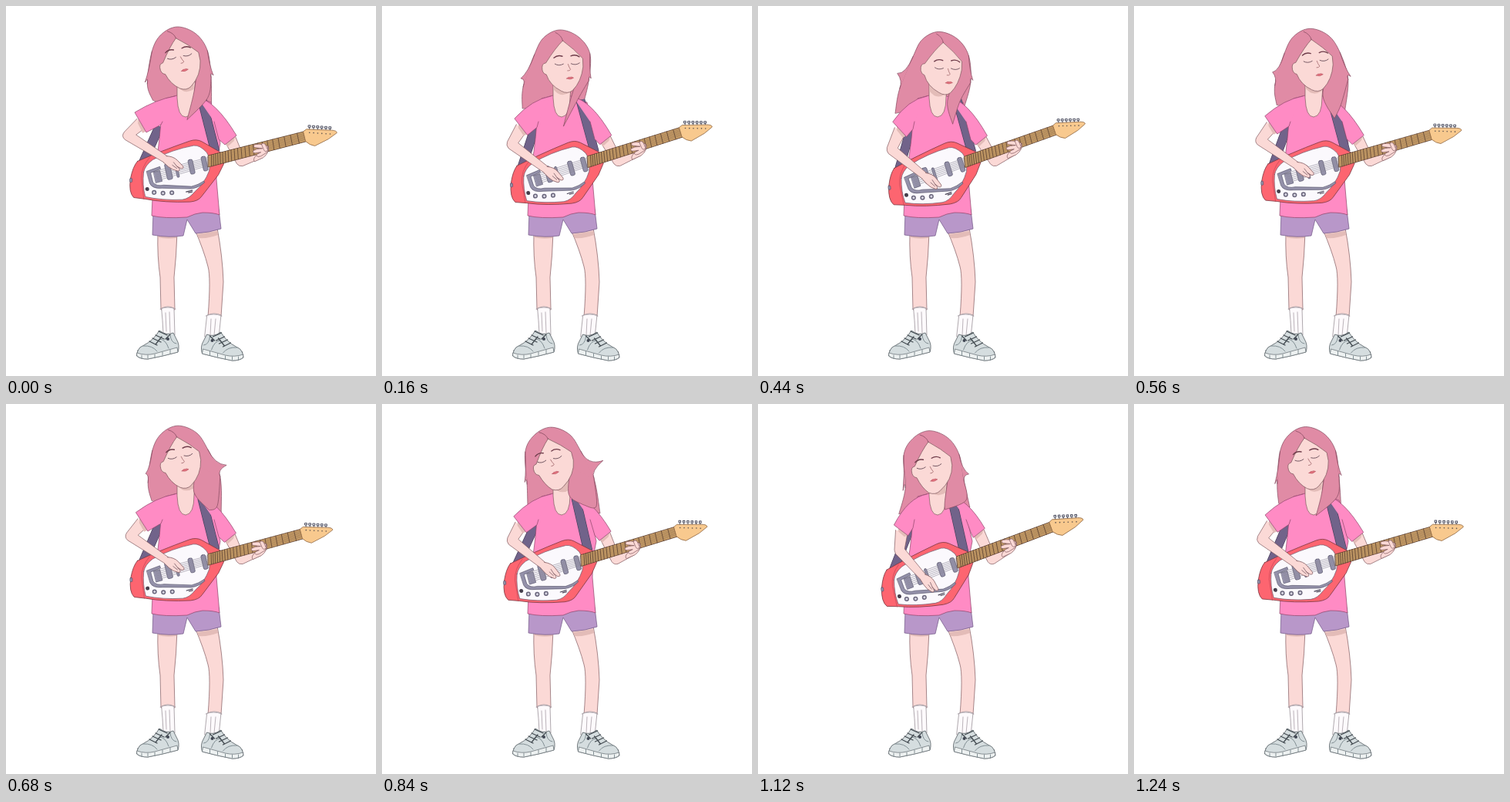
An HTML page for the animation above (1280 ms loop, 480 px wide and 480 px high).

```html
<!DOCTYPE html>
<html lang="en">
<head>
<meta charset="utf-8">
<title>Guitar player</title>
<style>
  html, body { margin: 0; width: 100%; height: 100%; overflow: hidden; background: #fff; }
  svg { display: block; width: 100vw; height: 100vh; }
  path, circle, rect { stroke-linejoin: round; stroke-linecap: round; }
  .ln { fill: none; stroke: #5d4350; stroke-width: .8; }
  .skin { fill: #fbd9d6; stroke: #80595f; stroke-width: .7; }
  .shade { fill: #e3bcb8; }
  .hair { fill: #e08ba5; stroke: #85495f; stroke-width: .7; }
  .shirt { fill: #ff8bc4; stroke: #8d4569; stroke-width: .7; }
  .shorts { fill: #b897c9; stroke: #6f5585; stroke-width: .7; }
  .sock { fill: #fdfafc; stroke: #8d858c; stroke-width: .7; }
  .shoe { fill: #d5dddf; stroke: #535c61; stroke-width: .8; }
  .metal { fill: #9491aa; stroke: #4d4a61; stroke-width: .6; }
  .strapEdge { fill: none; stroke: #443a56; stroke-width: 12; stroke-linecap: butt; }
  .strap { fill: none; stroke: #71638a; stroke-width: 10.8; stroke-linecap: butt; }
</style>
</head>
<body>
<svg viewBox="0 0 480 480">
  <defs>
    <g id="shoe">
      <path class="shoe" d="M171 447L169.500 454Q174 458 184 458L203 454L223 449Q226 440 221 432L217 424Q208 428 199 421Q191 434 179 440Q173 442 171 447Z"/>
      <path d="M170 450Q181 454 193 451L222 443L223 449L203 454L184 458Q174 458 170 454Z" fill="#edf1f1" stroke="#626b70" stroke-width=".7"/>
      <path d="M178 441Q190 440 196 448M199 432Q207 432 211 444M213 427Q214 437 221 438M176 453v4M184 453v4M193 452v4M203 449v4M213 446v5" fill="none" stroke="#79868c" stroke-width=".9"/>
      <path d="M186 435l10 5M190 431l11 5M194 427l11 5M198 422l11 5M202 429l-8 10M213 426l-6 6" fill="none" stroke="#444c52" stroke-width="1.300"/>
      <circle cx="210" cy="432" r="2" fill="#404653"/>
    </g>
  </defs>

  <path id="backHair" class="hair"/>
  <path id="flickL" class="hair"/>
  <path id="flickR" class="hair"/>
  <path id="backStrapEdge" class="strapEdge"/>
  <path id="backStrap" class="strap"/>

  <path class="skin" d="M197 294Q196 325 200 352L201 394H219L218 352Q221 325 222 294Z"/>
  <path class="skin" d="M245 290Q257 318 262 338Q266 352 262 403H279L282 358Q281 325 274 288Z"/>
  <path class="shade" d="M197 297L222 298L221 301Q208 303 197 300ZM248 296L274 292L275 297Q262 302 250 301Z"/>
  <path class="sock" d="M202 392Q210 388 218 392L219 427Q211 432 204 425L203 408Z"/>
  <path class="sock" d="M261 401Q270 397 279 401L276 430Q268 434 258 429Z"/>
  <path d="M200 393q10 -4 20 0M207 398l1 24M212 397l1 27M259 402q10 -4 21 0M266 406l-1 21M272 406l-2 21" fill="none" stroke="#aaa1a9" stroke-width=".8"/>
  <use href="#shoe"/>
  <use href="#shoe" transform="translate(477.500 2) scale(-1 1)"/>
  <path class="shorts" d="M191 267L190 297Q212 301 230 298L235 277L246 295Q264 294 279 289L276 264Z"/>

  <path class="shirt" d="M222 116L207 120L201 150Q198 190 191 225L189 272Q205 276 235 274Q245 269 255 268Q270 268 277 271L273 225Q273 200 278 178L266 125L245 117Z"/>
  <path class="skin" d="M222 92V119Q223 144 233 144Q244 143 244 118L246 92Z"/>
  <path id="neckShade" class="shade"/>
  <path id="frontStrapEdge" class="strapEdge"/>
  <path id="frontStrap" class="strap"/>
  <path id="armR" class="skin"/>
  <path id="cuffShadeR" class="shade"/>
  <path id="sleeveR" class="shirt"/>

  <g id="guitar">
    <path d="M170 200Q200 187 238 174Q247 171 254 175L278 189Q284 196 282 204L275 218L253 246Q249 252 238 253Q205 254 180 249L165 247Q158 240 161 222Q164 207 170 200Z" fill="#fd6570" stroke="#7b3943" stroke-width=".8"/>
    <path d="M186 195Q175 207 175 222L178 249" fill="none" stroke="#c54858" stroke-width=".7"/>
    <rect x="160" y="222" width="3" height="5" rx="1" class="metal"/>
    <path d="M178 214Q180 205 190 198Q215 185 243 180Q251 179 260 189Q266 198 263 213Q257 229 244 240Q237 249 228 250Q202 251 180 246Q176 231 178 214Z" fill="#fbf9fd" stroke="#70566a" stroke-width=".7"/>
    <path class="metal" d="M182 213L199 207L200 210L187 215L190 227Q194 233 204 231L240 233Q249 231 256 226L257 228Q249 235 239 236L202 235Q189 236 186 229Z"/>
    <path class="metal" d="M191 214L199 212L202 226L194 228Z"/>
    <g class="metal">
      <rect x="207" y="203" width="7" height="21" rx="2" transform="rotate(-12 210 214)"/>
      <rect x="220" y="204" width="3" height="17" rx="1" transform="rotate(-12 222 213)"/>
      <rect x="237" y="198" width="6" height="19" rx="2" transform="rotate(-12 240 207)"/>
      <rect x="254" y="194" width="6" height="19" rx="2" transform="rotate(-12 257 203)"/>
    </g>
    <g fill="#d7d5e2" stroke="#6a667c" stroke-width="1.500"><circle cx="191.500" cy="240.500" r="2.300"/><circle cx="203" cy="241.500" r="2.300"/><circle cx="214.500" cy="241" r="2.300"/></g>
    <circle cx="182.500" cy="236" r="2.500" fill="#443e4c"/>
    <path d="M233 240l8 -2M236 241l5 -1" fill="none" stroke="#4c4658" stroke-width="1.200"/>
    <path id="bodyStrings" fill="none" stroke="#8b8796" stroke-width=".6"/>
    <g id="neckPart">
      <path id="pegs" fill="#f4f4f8" stroke="#4d4f60" stroke-width="1"/>
      <path d="M262 193L388 162L391 175L262 208Z" fill="#d2a66c" stroke="#5e4030" stroke-width=".9"/>
      <path id="frets" fill="none" stroke="#614634" stroke-width=".9"/>
      <path id="neckStrings" fill="none" stroke="#745841" stroke-width=".5"/>
      <path d="M387 162L391 159L424 160.500Q431 161 431 164L420 172L402 181Q395 180 390 175Z" fill="#f8c98e" stroke="#8f6744" stroke-width=".8"/>
      <path id="pins" fill="none" stroke="#5f5450" stroke-width="1.600"/>
    </g>
  </g>

  <g id="fretHand">
    <path class="skin" d="M12 -5Q13 3 5 9L-6 14Q-9 11 -4 6L4 0Z"/>
    <path class="skin" d="M11 -6Q3 -10 -6 -8Q-9 -5 -5 -4L4 -3Q-4 -3 -8 0Q-9 3 -5 3L2 2Q-3 4 -4 6Q-2 9 2 7L10 2Z"/>
    <path class="skin" d="M3 -9Q6 -11 8 -8L11 -1Q8 3 6 -1Z"/>
  </g>

  <path id="armL" class="skin"/>
  <g id="strumHand">
    <path d="M-3 -4.500Q5 -8 12 -5.500L22 -1.500Q25 1 21 2.500L15 2Q23 4 19 7Q12 9 5 7L-3 4.500" class="skin"/>
    <path class="ln" d="M9 -1L15 2M9 3L16 4.500" style="stroke-width:.6"/>
  </g>
  <path id="cuffShadeL" class="shade"/>
  <path id="sleeveL" class="shirt"/>

  <path id="lock" class="hair"/>
  <g id="head">
    <path id="face" class="skin"/>
    <path class="ln" style="stroke:#85495f;stroke-width:.7" d="M0 -34Q-1 -41 -9 -45"/>
    <g id="features">
      <path class="ln" d="M-16 0Q-11 3.500 -5 .5M5 .5Q11 3.500 16 0"/>
      <path class="ln" style="stroke:#6f3d4b;stroke-width:1.400" d="M-17 -8Q-12 -12 -6 -9.500M5 -9.500Q11 -12 16 -8"/>
      <path class="ln" style="stroke:#a66d71" d="M1 1Q2 5 4 8Q3 10 0 9.500"/>
      <path d="M-1.500 19.500Q1 17 3 18Q5 17 7.500 19Q3 22 -1.500 19.500Z" fill="#e5747f" stroke="#ad4e5d" stroke-width=".5"/>
    </g>
  </g>
</svg>
<script>
const LOOP = 1280, STEP = 40;

const swing = u => (1 - Math.cos(Math.PI * u)) / 2;
const rush = u => u * u;
// Strum: time, depth of the stroke, easing towards the next beat.
const BEATS = [[0, 0, swing], [330, .93, swing], [640, .13, swing], [750, .13, swing], [1020, 1, rush], [LOOP, 0]];

const el = id => document.getElementById(id);
const set = (id, d) => el(id).setAttribute('d', d);
const move = (id, x, y, r = 0) => el(id).setAttribute('transform', `translate(${x} ${y}) rotate(${r})`);
const pt = p => p[0].toFixed(2) + ' ' + p[1].toFixed(2);
const mix = (a, b, k) => [a[0] + (b[0] - a[0]) * k, a[1] + (b[1] - a[1]) * k];
const add = (p, v, k = 1) => [p[0] + v[0] * k, p[1] + v[1] * k];
const unit = v => { const l = Math.hypot(v[0], v[1]) || 1; return [v[0] / l, v[1] / l]; };
const spin = (x, y, deg) => {
  const a = deg * Math.PI / 180, c = Math.cos(a), s = Math.sin(a);
  return [x * c - y * s, x * s + y * c];
};

function strumAt(t) {
  const i = BEATS.findIndex((b, n) => t < BEATS[n + 1][0]);
  const [t0, from, ease] = BEATS[i], [t1, to] = BEATS[i + 1];
  return from + (to - from) * ease((t - t0) / (t1 - t0));
}

function smooth(p) {
  let d = 'M' + pt(p[0]);
  for (let i = 0; i < p.length - 1; i++) {
    const a = p[i - 1] || p[i], b = p[i], c = p[i + 1], e = p[i + 2] || c;
    d += `C${pt(add(b, [c[0] - a[0], c[1] - a[1]], 1 / 6))} ${pt(add(c, [e[0] - b[0], e[1] - b[1]], -1 / 6))} ${pt(c)}`;
  }
  return d;
}

// Tapered arm with a rounded elbow.
function limb(a, b, c, w1, w2, w3) {
  const normal = (p, q) => unit([p[1] - q[1], q[0] - p[0]]);
  const n1 = normal(a, b), n2 = normal(b, c), nb = unit(add(n1, n2));
  const miter = w2 / Math.max(.45, nb[0] * n1[0] + nb[1] * n1[1]);
  return `M${pt(add(a, n1, w1))}L${pt(add(b, n1, w2))}Q${pt(add(b, nb, miter * .85))} ${pt(add(b, n2, w2))}`
    + `L${pt(add(c, n2, w3))}L${pt(add(c, n2, -w3))}L${pt(add(b, nb, -miter))}L${pt(add(a, n1, -w1))}`;
}

function buildGuitar() {
  let frets = '', pegs = '', pins = '', body = '', neck = '';
  for (let n = 1; n < 24; n++) {
    const u = 1 - (1 - 2 ** (-n / 12)) / .76;
    frets += `M${pt([262 + 126 * u, 193 - 31 * u])}L${pt([262 + 129 * u, 208 - 33 * u])}`;
  }
  for (let i = 0; i < 6; i++) {
    const x = 395 + i * 5.4, y = 156.5 + i * .4, s = 195.5 + i * 2.1;
    pegs += `M${x} ${y + 4}v-4m-1.200 -2.500h2.600v2.500h-2.600z`;
    pins += `M${x} ${y + 7}h.1`;
    body += `M${193 + i * .6} ${213 + i * 2.4}L262 ${s}`;
    neck += `M262 ${s}L389 ${164 + i * 1.8}`;
  }
  set('frets', frets); set('pegs', pegs); set('pins', pins);
  set('bodyStrings', body); set('neckStrings', neck);
}

// The crown follows the head; the ends trail behind the sway.
function drawHair(head, k, s, wave) {
  const [cx, cy] = head, from = (x, y) => [cx + x, cy + y];
  const templeL = from(-38, -16), templeR = from(34, -17);
  const midL = from(-45 - 12 * s, 26), midR = [272 + 6 * wave(175), cy + 18];
  const endL = [190 - 12 * k - 4 * s, 122 + 24 * k];
  const endR = [272 + 11 * wave(240), 134 + 8 * wave(225)];
  const crown = [templeL, from(-26, -38), from(-5, -48), from(19, -39), templeR];
  set('backHair', smooth([endL, midL, ...crown, midR, endR]) + 'L240 132L215 132Z');

  const strand = (a, b, tip) => `M${pt(a)}Q${pt(mix(a, b, .55))} ${pt(tip)}Q${pt(mix(a, b, .75))} ${pt(b)}`;
  const lift = Math.max(0, wave(245));
  set('flickL', strand(templeL, midL, add(midL, [-3, -8 - 12 * wave(120)])));
  set('flickR', strand(templeR, midR, add(midR, [3 + 9 * lift, -3 - 20 * lift])));

  const start = from(21, 4), inner = [244 + 2 * s, 112 + 16 * k];
  const tip = [249 + 15 * wave(200), 144 + 14 * wave(75)];
  set('lock', smooth([start, inner, tip]) + smooth([tip, add(endR, [-5, -9]), midR]).replace('M', 'L'));
}

function drawHead([cx, cy], tilt, yaw, nod) {
  const jaw = yaw * .7;
  move('head', cx, cy, tilt);
  move('features', yaw, nod);
  set('face', `M0 -34Q-10 -25 -23 -6Q-29 -6 -28 3Q-27 8 -23 9Q-19 23 ${jaw - 8} 31Q${jaw} 36 ${jaw + 7} 31Q22 20 25 1L25 -10Q15 -22 0 -34Z`);
  const y = Math.min(cy + 32, 114);
  set('neckShade', `M222.500 ${y - 12}L243.500 ${y - 12}L243.500 ${y + 1}Q231 ${y + 9} 222.500 ${y - 3}Z`);
}

function drawSleeves(lo, li, ro, ri) {
  set('sleeveL', `M219 117Q195 121 ${pt(lo)}L${pt(li)}L201 ${li[1] - 10}L203 150`);
  set('sleeveR', `M248 118Q272 123 ${pt(ro)}L${pt(ri)}L276 ${ri[1] - 7}L270 150`);
  const band = (a, b, v) => `M${pt(a)}L${pt(b)}L${pt(add(b, v))}L${pt(add(mix(a, b, .3), v, .8))}Z`;
  set('cuffShadeL', band(mix(lo, li, .3), mix(lo, li, .95), [-4, 2]));
  set('cuffShadeR', band(mix(ro, ri, .1), mix(ro, ri, .9), [2, 4]));
}

function drawGuitar(joint, angle, size) {
  const [x, y] = joint;
  el('guitar').setAttribute('transform', `translate(${x} ${y}) rotate(${angle}) translate(-262 -200)`);
  el('neckPart').setAttribute('transform', `translate(262 200) scale(${size}) translate(-262 -200)`);
  for (const part of ['', 'Edge']) {
    set('frontStrap' + part, `M${254 + (x - 262) * .7} 122L${x + 9} ${y - 12}`);
    set('backStrap' + part, `M199 156L${pt(add(joint, spin(-92, 18, angle)))}`);
  }
}

// Everything hangs on the strum depth k and the body sway s.
function render(t) {
  const wave = peak => Math.cos((t / LOOP * 360 - peak) * Math.PI / 180);
  const k = strumAt(t), s = wave(95);

  const joint = [263 + 6 * s, 201 + 3 * k - 2 * k * s];
  const angle = -.3 - 7.2 * k;
  const size = .972 + .025 * wave(310);
  drawGuitar(joint, angle, size);

  const cuffL = [167 + 11 * k, 138 + 20 * k - 3 * k * s], pitL = [182 + 15 * k, 164 + 8 * k];
  const cuffR = [299 - 4 * k + 2 * k * s, 168 - 4 * k + 5 * k * s], pitR = add(cuffR, [-15, 12]);
  drawSleeves(cuffL, pitL, cuffR, pitR);

  const elbow = [158 + 26 * k - 5 * k * s, 168 + 26 * k];
  const wrist = [209 + 10 * k + 2 * s, 200 + 31 * k];
  set('armL', limb(mix(cuffL, pitL, .55), elbow, wrist, 8, 6.5, 4.5));
  const aim = Math.atan2(wrist[1] - elbow[1], wrist[0] - elbow[0]) * 180 / Math.PI;
  move('strumHand', wrist[0], wrist[1], aim - 8);

  const hand = add(joint, spin(67 * size, -13 * size, angle));
  set('armR', limb(add(cuffR, [-8, 5]), [305 + 2 * s, 202], add(hand, [2, 5]), 7.5, 6, 4.5));
  move('fretHand', hand[0], hand[1]);

  const head = [228 + 8 * s + 6 * k, 75 + 9 * k];
  drawHead(head, -11 + 8 * s + 8 * k, .5 + 6.5 * s, -10 + 10 * k + 2 * s);
  drawHair(head, k, s, wave);
}

function tick(ms) {
  const t = Math.floor((ms % LOOP) / STEP) * STEP;
  render(t < 80 ? 0 : t);
  requestAnimationFrame(tick);
}

buildGuitar();
render(0);
requestAnimationFrame(tick);
</script>
</body>
</html>
```
